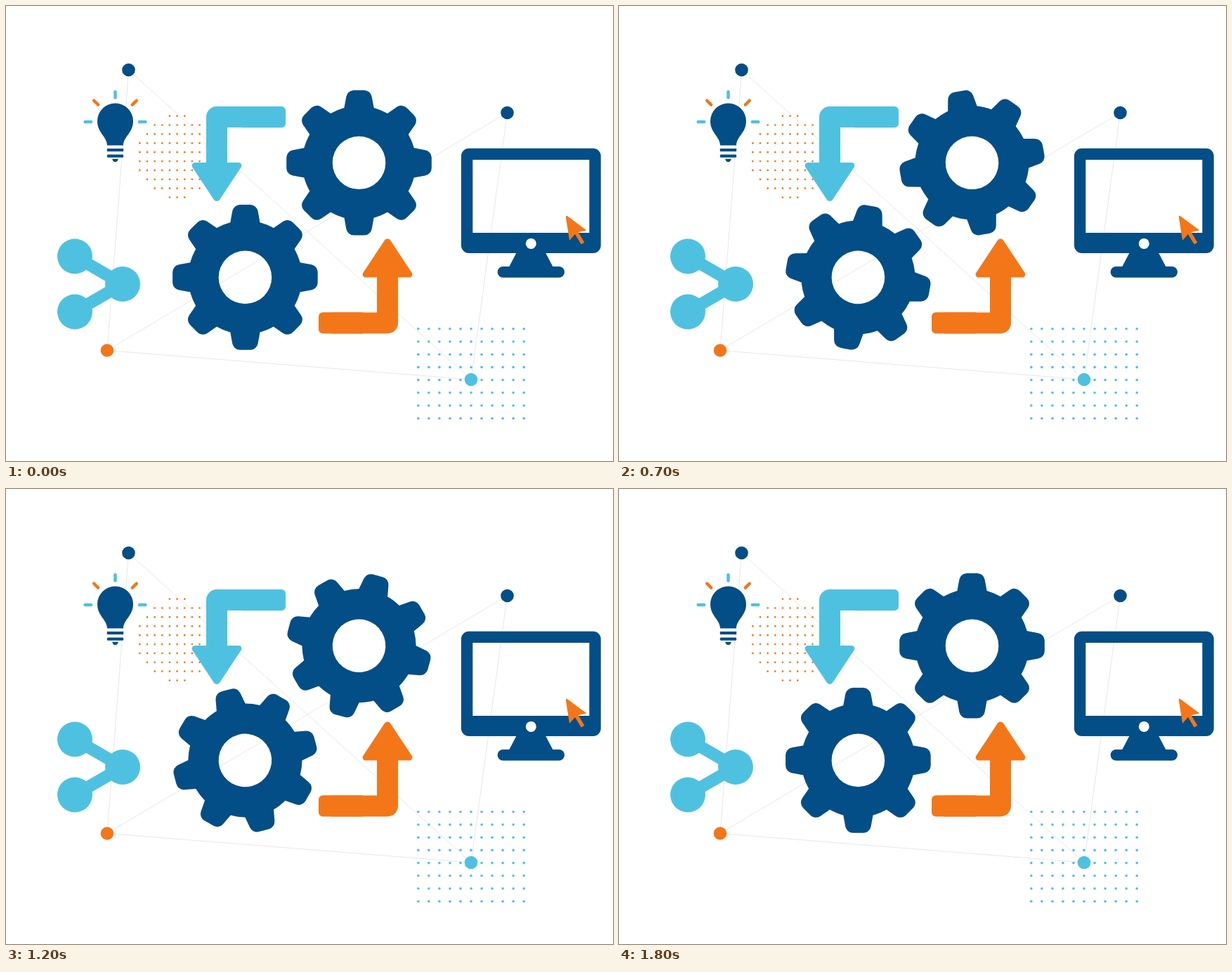
An HTML page with a canvas for the animation above (1900 ms loop, 864 px wide and 648 px high).

```html
<!DOCTYPE html>
<html lang="en">
<head>
<meta charset="utf-8">
<title>Turning gears</title>
<style>
  html, body { margin: 0; width: 100%; height: 100%; overflow: hidden; background: #fff; }
  canvas { display: block; }
</style>
</head>
<body>
<canvas id="stage" width="864" height="648"></canvas>
<script>
const stage = document.getElementById('stage');
const ctx = stage.getContext('2d');
const NAVY = '#034e86', SKY = '#4fc1e0', ORANGE = '#f37719', THREAD = '#e8e8e8';
const STEP_MS = 100, STEPS = 19;
const radians = degrees => degrees * Math.PI / 180;

// Runs a drawing function in a moved and turned coordinate system.
function at(x, y, degrees, paint) {
  ctx.save();
  ctx.translate(x, y);
  ctx.rotate(radians(degrees));
  paint();
  ctx.restore();
}

function disc(x, y, r, color) {
  ctx.fillStyle = color;
  ctx.beginPath();
  ctx.arc(x, y, r, 0, Math.PI * 2);
  ctx.fill();
}

function stroke(points, width, color, cap = 'butt') {
  ctx.strokeStyle = color;
  ctx.lineWidth = width;
  ctx.lineCap = cap;
  ctx.lineJoin = 'round';
  ctx.beginPath();
  points.forEach(([x, y]) => ctx.lineTo(x, y));
  ctx.stroke();
}

// Fills a closed polygon; each point is [x, y, corner radius].
function polygon(points, color) {
  const [ax, ay] = points[points.length - 1];
  const [bx, by] = points[0];
  ctx.fillStyle = color;
  ctx.beginPath();
  ctx.moveTo((ax + bx) / 2, (ay + by) / 2);
  points.forEach(([x, y, r = 0], i) => {
    const [nx, ny] = points[(i + 1) % points.length];
    ctx.arcTo(x, y, nx, ny, r);
  });
  ctx.fill();
}

// Completes the right half of an outline with its mirror image.
const mirror = half => [...half, ...half.map(([x, ...rest]) => [-x, ...rest]).reverse()];

function bar(cx, top, width, height, r, color) {
  at(cx, top, 0, () => polygon(mirror([[width / 2, 0, r], [width / 2, height, r]]), color));
}

const nodes = {
  top: { pos: [174.5, 91], color: NAVY },
  left: { pos: [144, 490.5], color: ORANGE },
  bottom: { pos: [662, 532], color: SKY },
  right: { pos: [713.5, 152], color: NAVY }
};

function threads() {
  const { top, left, bottom, right } = nodes;
  for (const path of [[right, left, top, bottom, right], [left, bottom]]) {
    stroke(path.map(node => node.pos), 1, THREAD);
  }
}

function dotFields() {
  const gapX = 10.65, gapY = 12.88, radius = 60;
  for (let row = -4.5; row <= 4.5; row++) {
    const half = Math.floor(Math.sqrt(radius ** 2 - (row * gapY) ** 2) / gapX);
    for (let i = -half; i <= half; i++) {
      disc(243.6 + i * gapX, 214.6 + row * gapY, 1.35, ORANGE);
    }
  }
  for (let row = 0; row < 8; row++) {
    for (let col = 0; col < 11; col++) {
      disc(586.8 + col * 15.04, 459.8 + row * 18.2, 1.8, SKY);
    }
  }
}

function bulb() {
  at(155.5, 164, 0, () => {
    ctx.fillStyle = NAVY;
    ctx.beginPath();
    ctx.moveTo(-11.5, 34.5);
    ctx.bezierCurveTo(-11.5, 22, -25.5, 17, -25.5, 0);
    ctx.arc(0, 0, 25.5, Math.PI, 0);
    ctx.bezierCurveTo(25.5, 17, 11.5, 22, 11.5, 34.5);
    ctx.fill();
    bar(0, 39, 23.4, 4.2, 0, NAVY);
    bar(0, 47.5, 23.4, 4.3, 1.5, NAVY);
    polygon(mirror([[4.5, 53.8], [2.5, 58, 2]]), NAVY);
  });
  for (let i = 0; i < 5; i++) {
    at(155.5, 165, i * 45 - 180, () =>
      stroke([[34.4, 0], [42.8, 0]], 4.5, i % 2 ? ORANGE : SKY, 'round'));
  }
}

function share() {
  const hub = [166, 396];
  for (const side of [-1, 1]) {
    const end = [98, 396 + side * 39.5];
    stroke([end, hub], 17.5, SKY);
    disc(...end, 25, SKY);
  }
  disc(...hub, 25, SKY);
}

// A bent arrow, with the origin at the middle of the head's base.
function arrow(color) {
  bar(64, -80, 68, 30.2, 6, color);
  stroke([[80, -65], [0, -65], [0, 2]], 30, color);
  polygon([[-39, 0, 4.2], [39, 0, 4.2], [0, 59, 4.8]], color);
}

function monitor() {
  at(747.3, 203, 0, () => {
    polygon(mirror([[20.5, 148], [32, 170]]), NAVY);
    bar(0, 168, 95.3, 15.7, 7.8, NAVY);
    // The frame is stroked with the gap left open, so the threads show through the screen.
    ctx.fillStyle = NAVY;
    ctx.beginPath();
    ctx.roundRect(-99.4, -0.2, 198.8, 149.2, 11);
    ctx.rect(-83, 16, 166, 104);
    ctx.fill('evenodd');
    disc(0, 135.4, 7.5, '#fff');
  });
  at(796.3, 297, -31, () =>
    polygon([[0, 0, 1.5], ...mirror([[14.2, 34.7], [2.7, 31], [2.7, 48]])], ORANGE));
}

function gear(x, y, degrees) {
  at(x, y, degrees, () => {
    ctx.fillStyle = NAVY;
    ctx.beginPath();
    ctx.arc(0, 0, 81, 0, Math.PI * 2);
    ctx.arc(0, 0, 37.8, 0, Math.PI * 2, true);
    ctx.fill();
    for (let i = 0; i < 8; i++) {
      at(0, 0, i * 45, () => polygon(mirror([[16.5, 103.3, 11], [21.7, 75]]), NAVY));
    }
  });
}

function draw(now) {
  const degrees = Math.floor(now / STEP_MS) % STEPS * 5;
  ctx.fillStyle = '#fff';
  ctx.fillRect(0, 0, stage.width, stage.height);
  threads();
  dotFields();
  Object.values(nodes).forEach(({ pos, color }) => disc(...pos, 9.3, color));
  bulb();
  share();
  at(300, 223, 0, () => arrow(SKY));
  at(543, 386.5, 180, () => arrow(ORANGE));
  monitor();
  gear(502.5, 223.3, degrees);
  gear(340.4, 386.4, -degrees);
}

const start = performance.now();
function tick() {
  draw(performance.now() - start);
  requestAnimationFrame(tick);
}
tick();
</script>
</body>
</html>
```
